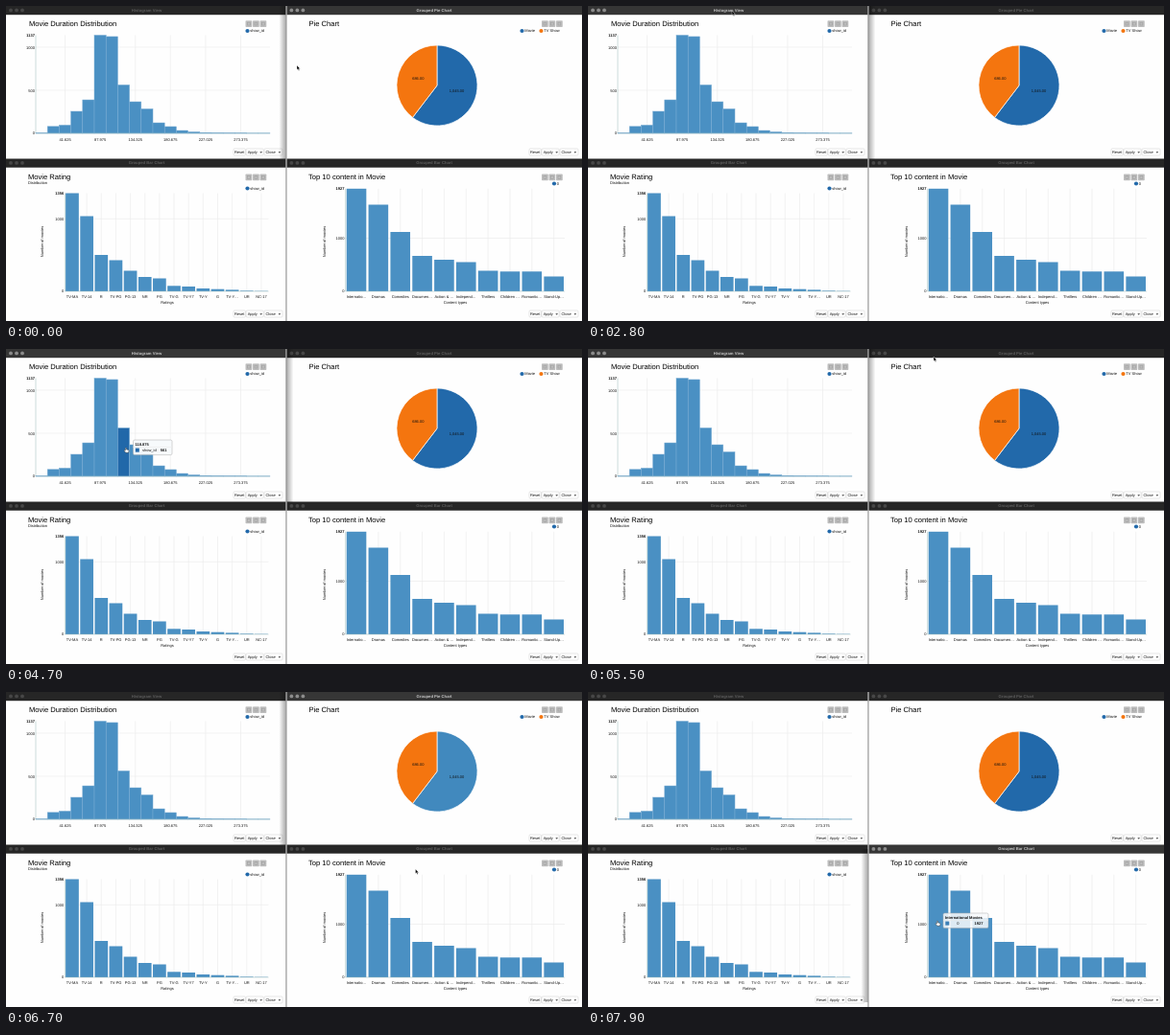
These frames come from a looping animation (600 by 329 pixels, 8000 ms). An HTML page:

```html
<!DOCTYPE html>
<html lang="en">
<head>
<meta charset="utf-8">
<title>Chart dashboard</title>
<style>
  html, body { margin: 0; width: 100%; height: 100%; overflow: hidden; background: #fff; }
  svg { display: block; width: 600px; height: 329px; }
  text { font: 4px "Liberation Sans", Arial, sans-serif; fill: #111; text-rendering: geometricPrecision; }
  .mid { text-anchor: middle; }
  .end { text-anchor: end; }
  .bold { font-weight: bold; }
  .head { font-size: 7.6px; fill: #000; }
  .bar { fill: #4a90c3; }
  .bar.lit { fill: #2168a9; }
  .hist .bar { stroke: #79acd3; stroke-width: .5; }
  .grid { stroke: #ececec; stroke-width: .7; }
  .axis { stroke: #9bb; stroke-width: .5; }
  .strip { fill: #262626; }
  .caption { font-size: 4.2px; font-weight: bold; fill: #5c5c5c; }
  .light { fill: #474747; }
  .focus .strip { fill: #363636; }
  .focus .caption { fill: #c6c6c6; }
  .focus .light { fill: #8c8c8c; }
  .button { fill: #fff; stroke: #ccc; stroke-width: .5; }
  .tool { fill: #bebebe; }
  .mark { fill: none; stroke: #a2a2a2; stroke-width: .7; }
</style>
</head>
<body>
<svg id="stage" viewBox="0 0 600 329"></svg>
<script>
const LOOP = 8000, STEP = 100;
const BLUE = '#2269aa', ORANGE = '#f4750f';
const LIGHT_BLUE = '#4189be', LIGHT_ORANGE = '#f8995b';
const stage = document.getElementById('stage');

const rect = (x, y, w, h, cls = '', more = '') =>
  `<rect x="${x}" y="${y}" width="${w}" height="${h}" class="${cls}" ${more}/>`;
const text = (x, y, s, cls = '', more = '') =>
  `<text x="${x}" y="${y}" class="${cls}" ${more}>${s}</text>`;
const line = (x1, y1, x2, y2, cls = 'grid') =>
  `<line x1="${x1}" y1="${y1}" x2="${x2}" y2="${y2}" class="${cls}"/>`;
const dot = (x, y, r, fill) => `<circle cx="${x}" cy="${y}" r="${r}" fill="${fill}"/>`;
const legend = (x, y, label, fill = BLUE) => dot(x, y, 2.1, fill) + text(x + 2.8, y + 1.4, label);

// Histogram: equal bins from x = 31
const bins = [4, 80, 95, 255, 388, 1137, 1121, 561, 366, 283, 122, 78, 33, 17, 9, 6, 4, 3, 2, 2];
const BIN = 12.2, BIN_X = 31, BASE = 133, BIN_SCALE = 102.5 / 1137;
const binName = i => (10.725 + 15.45 * i).toFixed(3);
const binTop = i => BASE - bins[i] * BIN_SCALE;

function histogram() {
  let s = line(31, 43, 275, 43) + line(31, 88, 275, 88);
  for (let i = 2; i < 20; i += 3) {
    const x = BIN_X + BIN * (i + .5);
    s += line(x, 30.5, x, BASE) + text(x, 140.6, binName(i), 'mid');
  }
  bins.forEach((v, i) => { s += rect(BIN_X + BIN * i, binTop(i), BIN, v * BIN_SCALE, 'bar'); });
  return s + line(31, 30.5, 31, BASE, 'axis') + line(31, BASE, 275, BASE, 'axis') +
    text(30, 32, '1137', 'end bold') + text(30, 44.5, '1000', 'end') +
    text(30, 89.5, '500', 'end') + text(30, 134, '0', 'end') + legend(251.5, 26, 'show_id');
}

// Category chart standing on y = 298
function barChart({ x, step, wide, tops, names, mid, max, maxY, thousand, side, caption }) {
  const right = x + step * tops.length;
  let s = line(x, thousand, right, thousand);
  tops.forEach((top, i) => {
    const c = x + step * (i + .5);
    s += line(c, maxY, c, 298) + rect(c - wide / 2, top, wide, 298 - top, 'bar') +
      text(c, 304.6, names[i], 'mid');
  });
  return s + line(x, maxY, x, 298, 'axis') + line(x, 298, right, 298, 'axis') +
    text(x - 1.2, maxY + 1.6, max, 'end bold') + text(x - 1.2, thousand + 1.4, '1000', 'end') +
    text(x - 1.2, 299.3, '0', 'end') + text(mid, 310.6, caption, 'mid') +
    text(0, 0, 'Number of movies', 'mid', `transform="translate(${side} 246) rotate(-90)"`);
}

const ratings = barChart({
  x: 61.4, step: 15.15, wide: 13.7, mid: 168, max: '1356', maxY: 195.5, thousand: 222.3, side: 39.3,
  caption: 'Ratings',
  tops: [195.5, 219.5, 260, 265.5, 276.5, 283, 284.5, 292.3, 293, 295, 295.7, 296.4, 297.4, 297.7],
  names: 'TV-MA TV-14 R TV-PG PG-13 NR PG TV-G TV-Y7 TV-Y G TV-Y… UR NC-17'.split(' ')
}) + legend(251.5, 190.5, 'show_id') + text(23, 185.8, 'Distribution');

const genres = barChart({
  x: 353.6, step: 22.85, wide: 20.6, mid: 468, max: '1927', maxY: 190.8, thousand: 242.5, side: 333.3,
  caption: 'Content types',
  tops: [190.8, 207.5, 236, 261, 265, 267.5, 276.5, 277.3, 277.3, 282.5],
  names: ['Internatio…', 'Dramas', 'Comedies', 'Documen…', 'Action &amp; …', 'Independ…',
    'Thrillers', 'Children …', 'Romantic…', 'Stand-Up…']
}) + legend(571, 185.5, '0');

// Pie: angles in degrees clockwise from the top
const PIE = { x: 449, y: 83, r: 42, split: 217.3 };
function slice(from, to, r) {
  const at = a => {
    const n = a * Math.PI / 180;
    return `${PIE.x + r * Math.sin(n)} ${PIE.y - r * Math.cos(n)}`;
  };
  return `M${PIE.x} ${PIE.y}L${at(from)}A${r} ${r} 0 ${to - from > 180 ? 1 : 0} 1 ${at(to)}Z`;
}
const pie = '<g stroke="#fff" stroke-width=".7"><path id="movie"/><path id="show"/></g>' +
  text(469.5, 90.2, '1,045.00', 'mid') + text(429.3, 76.6, '686.00', 'mid') +
  legend(537.5, 26, 'Movie') + legend(557.5, 26, 'TV Show', ORANGE);

function footer(x, y) {
  const arrow = ax => `<path d="M${ax} ${y + 3.2}h2.6l-1.3 1.6z" fill="#333"/>`;
  return rect(x, y, 12.4, 7, 'button', 'rx="1"') + rect(x + 13.1, y, 18, 7, 'button', 'rx="1"') +
    rect(x + 32, y, 19, 7, 'button', 'rx="1"') + text(x + 6.2, y + 4.9, 'Reset', 'mid') +
    text(x + 19.7, y + 4.9, 'Apply', 'mid') + text(x + 38.6, y + 4.9, 'Close', 'mid') +
    arrow(x + 27.4) + arrow(x + 46.6);
}

function tools(x, y) {
  let s = '';
  for (let i = 0; i < 3; i++) {
    const bx = x + i * 7.5;
    s += rect(bx, y, 6.8, 6.8, 'tool', 'rx=".8"') + rect(bx + 2, y + 2, 2.8, 2.8, 'mark');
  }
  return s;
}

function pane(x, y, w, h, name, title, titleX, body, cls) {
  let s = rect(x, y, w, h, '', 'fill="#fefefe"') + rect(x, y, w, 9.2, 'strip');
  for (let i = 0; i < 3; i++) s += `<circle class="light" cx="${x + 5 + i * 6}" cy="${y + 4.4}" r="1.9"/>`;
  const right = x > 0;
  return `<g class="pane ${cls}">${s}${text(right ? 446 : 146.5, y + 5.9, name, 'mid caption')}` +
    text(titleX, y + (y ? 21.8 : 21.3), title, 'head') + tools(right ? 558 : 249.5, y + (y ? 16 : 15.2)) +
    footer(right ? 545 : 237, y ? 318 : 149) + body + '</g>';
}

stage.innerHTML = `<defs>
    <linearGradient id="shade"><stop offset="0" stop-color="#000" stop-opacity="0"/>
      <stop offset="1" stop-color="#000" stop-opacity=".32"/></linearGradient></defs>` +
  pane(0, 0, 291.6, 159.5, 'Histogram View', 'Movie Duration Distribution', 24, histogram(), 'hist') +
  pane(292.4, 0, 307.6, 159.5, 'Grouped Pie Chart', 'Pie Chart', 315.5, pie, '') +
  pane(0, 159.5, 291.6, 169.5, 'Grouped Bar Chart', 'Movie Rating', 23, ratings, '') +
  pane(292.4, 159.5, 307.6, 169.5, 'Grouped Bar Chart', 'Top 10 content in Movie', 315, genres, '') +
  rect(291.4, 0, 1.1, 329, '', 'fill="#8d8d8d"') +
  rect(0, 0, 7, 160, '', 'id="shadow" fill="url(#shade)"') +
  `<g id="tip"></g><g id="cursor">
    <path id="arrow" d="M0 0V4.6L1.1 3.7L1.9 5.4L2.7 5L1.9 3.4H3.4Z" fill="#000" stroke="#fff" stroke-width=".35"/>
    <path id="hand" d="M-.6 -1.6q.6-.7 1.1 0v1.5l2 .5q.6.2.5.9l-.5 2h-2.7l-1.9-2.3q0-.8 1.5 0z"
      fill="#fff" stroke="#333" stroke-width=".45"/></g>`;

const byId = id => document.getElementById(id);
const panes = [...document.querySelectorAll('.pane')];
const binBars = [...document.querySelectorAll('.hist .bar')];

// Pointer path: time, x, y
const path = [
  [0, 303, 62], [200, 310, 47], [600, 310, 47], [800, 363, 2], [1900, 363, 2], [2000, 363, 2.5],
  [2500, 200, 4], [2800, 150, 5], [3200, 138, 112], [3300, 138, 112], [3600, 103, 75],
  [4100, 109, 92], [4400, 109, 92], [4700, 125, 105], [4900, 125, 105], [5500, 360, 8],
  [5800, 400, 5], [6100, 435.5, 92], [6300, 461, 100], [6500, 452, 112], [6700, 426.5, 185],
  [7000, 426.5, 186], [7400, 411, 198], [7500, 411, 198], [7700, 371, 200], [7900, 364, 241], [8000, 364, 241]
];

function pointer(t) {
  const i = Math.max(1, path.findIndex(p => p[0] >= t));
  const [t0, x0, y0] = path[i - 1], [t1, x1, y1] = path[i];
  const k = (t - t0) / (t1 - t0);
  return [x0 + (x1 - x0) * k, y0 + (y1 - y0) * k];
}

const focusAt = t => t < 2600 ? 1 : t < 5600 ? 0 : t < 7000 ? 1 : 3;

// What lies under the pointer in the focused window
function hover(t) {
  if (t < 0) return {};
  const [x, y] = pointer(t), focus = focusAt(t);
  if (focus === 0) {
    const i = Math.floor((x - BIN_X) / BIN);
    if (i >= 0 && i < bins.length && y > binTop(i) && y < BASE) return { bin: i };
  } else if (focus === 1) {
    const dx = x - PIE.x, dy = y - PIE.y;
    if (Math.hypot(dx, dy) < PIE.r) {
      const angle = (Math.atan2(dx, -dy) * 180 / Math.PI + 360) % 360;
      return { slice: angle < PIE.split ? 'movie' : 'show' };
    }
  } else if (x > 354.5 && x < 375.5 && y > 205) return { genre: true };
  return {};
}

function tipBox(x, y, w, title, key, value, fill, keyX, clear) {
  const h = title ? 15.6 : 10, row = y + h - 5;
  return rect(x, y, w, h, '', `rx="1.5" fill="#f7fafc" fill-opacity="${clear}" stroke="#aaa" stroke-width=".5"`) +
    (title ? text(x + 2, y + 5.9, title, 'bold') + line(x, y + 7.4, x + w, y + 7.4) : '') +
    rect(x + 2.3, row - 2, 4, 4, '', `fill="${fill}"`) + text(x + keyX, row + 1.5, key) +
    text(x + w - 5.6, row + 1.5, value, 'bold end');
}

function tooltip(over, x, y) {
  if (over.bin !== undefined)
    return tipBox(x + 7.5, y - 10, 40.5, binName(over.bin), 'show_id', bins[over.bin], BLUE, 9.5, .96);
  if (over.slice === 'movie') return tipBox(x + 3.5, y - 7, 47, '', 'Movie', '1,045.00', BLUE, 9, .85);
  if (over.slice === 'show') return tipBox(x + 3.5, y - 7, 47, '', 'TV Show', '686.00', LIGHT_ORANGE, 9, .82);
  if (over.genre) return tipBox(x + 6, y - 10, 47, 'International Movies', '0', '1927', '#3c7fb6', 14.2, .86);
  return '';
}

function draw(t) {
  const [x, y] = pointer(t), focus = focusAt(t), over = hover(t);
  panes.forEach((p, i) => p.classList.toggle('focus', i === focus));
  binBars.forEach((b, i) => b.classList.toggle('lit', i === over.bin));

  // Slice colours return a little after the pointer leaves
  const recent = [over, hover(t - 100), hover(t - 200)];
  const active = (recent.find(r => r.slice) || {}).slice;
  const radius = name => PIE.r + (over.slice === name ? 1.8 : 0);
  byId('movie').setAttribute('d', slice(0, PIE.split, radius('movie')));
  byId('show').setAttribute('d', slice(PIE.split, 360, radius('show')));
  byId('movie').setAttribute('fill', active === 'movie' ? LIGHT_BLUE : BLUE);
  byId('show').setAttribute('fill', active === 'show' ? LIGHT_ORANGE : ORANGE);

  const place = focus === 0 ? 'translate(299.4 0) scale(-1 1)' : `translate(284.4 ${focus === 3 ? 164 : 0})`;
  byId('shadow').setAttribute('transform', place);
  byId('tip').innerHTML = tooltip(over, x, y);
  byId('cursor').setAttribute('transform', `translate(${x} ${y})`);
  const hand = over.bin !== undefined || over.genre;
  byId('hand').style.display = hand ? '' : 'none';
  byId('arrow').style.display = hand ? 'none' : '';
}

const start = performance.now();
function tick() {
  const t = (performance.now() - start) % LOOP;
  draw(Math.floor(t / STEP) * STEP);
  requestAnimationFrame(tick);
}
tick();
</script>
</body>
</html>
```
